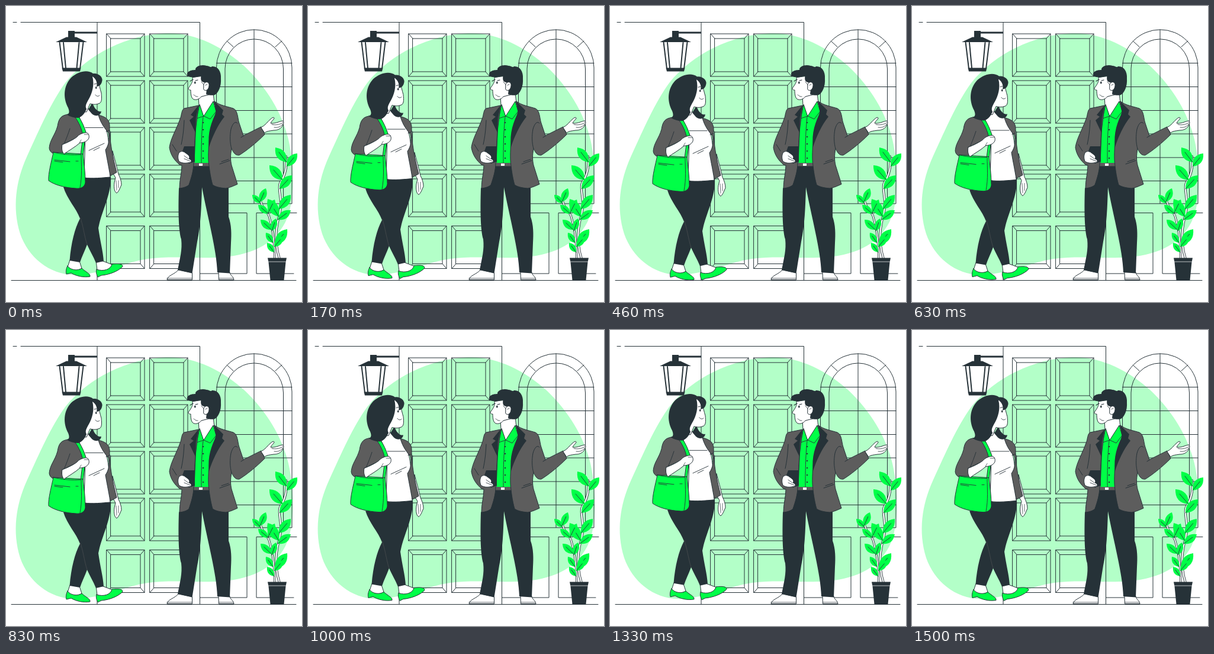
Animation, 500 px wide and 500 px high, one loop 1540 ms. Source, as an HTML page with a canvas:

```html
<!DOCTYPE html>
<html lang="en">
<head>
<meta charset="utf-8">
<title>At the front door</title>
<style>
html, body { margin: 0; width: 100%; height: 100%; overflow: hidden; background: #fff; }
canvas { display: block; width: 100vw; height: 100vh; }
</style>
</head>
<body>
<canvas id="stage" width="500" height="500"></canvas>
<script>
const ctx = document.getElementById('stage').getContext('2d');
const GREEN = '#00ff47', PALE = '#b3ffc8', DARK = '#263238', GRAY = '#5d5d5d', WHITE = '#fff';
const LOOP = 1540, LOWEST = 480, SWING = 3.8;

const shape = (d, fill, line = DARK, width = 1) => ({ path: new Path2D(d), fill, line, width });
const flat = (d, fill) => shape(d, fill, null);
const stroke = (d, width = 1, color = DARK) => shape(d, null, color, width);

function doorPanel(x, y) {
  return stroke(`M${x} ${y}h64v72h-64ZM${x + 7} ${y + 8}h50v56h-50Z
    M${x} ${y}l7 8M${x + 64} ${y}l-7 8M${x} ${y + 72}l7 -8M${x + 64} ${y + 72}l-7 -8`);
}

// A leaf grows from its base (x, y) to its tip (tx, ty).
function leaf([x, y, tx, ty]) {
  const dx = tx - x, dy = ty - y;
  const side = s => `${x + dx * .5 - dy * .48 * s} ${y + dy * .5 + dx * .48 * s}`;
  return [
    flat(`M${x} ${y}Q${side(1)} ${tx} ${ty}Q${side(-1)} ${x} ${y}Z`, GREEN),
    stroke(`M${x} ${y}L${x + dx * .68} ${y + dy * .68}`, .9)
  ];
}

const building = [
  flat(`M270 46C318 44 365 68 403 102C440 137 466 180 477 225C488 275 489 340 468 372
    C445 410 400 424 350 425C310 426 280 422 240 427C200 433 165 452 120 454
    C75 456 38 425 24 385C10 340 17 295 35 255C58 205 75 165 100 130C140 80 205 49 270 46Z`, PALE),
  stroke('M12 27.5H18M25 27.5H327.5V463.5M154 27.5V463.5M9 463.5H490'),
  ...[47, 126, 205, 284, 371.5].flatMap(y => [doorPanel(170, y), doorPanel(243, y)]),
  stroke(`M355.5 333.5V104A63.7 64 0 0 1 483 104V333.5ZM370 333.5V106A49.2 50 0 0 1 468.5 106V333.5
    M419 40V333.5M373 59L384 69M466 59L455 69`),
  stroke([96.5, 136.5, 176.5, 216, 256, 295.5].map(y => `M355.5 ${y}H483`).join('')),
  stroke('M342 349.5H407V452H327.5M491 349.5H423V452H486')
];

const lamp = [
  flat('M116 43.5H154V46.5H116ZM105 42H116V53H105Z', DARK),
  flat('M90 61H131L125 107H96Z', WHITE),
  stroke('M90.5 61L96 106M130.5 61L125 106M97 62L101 105M123.5 62L119.5 105', 2),
  flat('M84 61L102 52.5H119L137 61ZM94.5 104.5H126.5L125 110.5H96Z', DARK)
];

const leaves = [
  [474, 264, 455, 239], [474, 271, 492, 249], [467, 294, 445, 269], [462, 309, 483, 286],
  [461, 343, 481, 319], [461, 356, 442, 326], [459, 361, 481, 345], [455, 403, 475, 377],
  [430, 333, 416, 319], [429, 331, 439, 308], [443, 351, 426, 336], [443, 349, 454, 327],
  [448, 378, 430, 361], [449, 380, 456, 359], [451, 400, 439, 383], [453, 407, 468, 389],
  [453, 416, 441, 400]
].flatMap(leaf);

const plant = [
  stroke('M462 427C452 395 457 370 463 347C468 327 458 310 463 299C472 285 475 272 473 254', 4),
  stroke('M462 427C452 395 457 370 463 347C468 327 458 310 463 299C472 285 475 272 473 254', 2.3, WHITE),
  stroke('M454 427C453 402 452 380 444 354C438 342 430 338 430 325', 3.5),
  stroke('M454 427C453 402 452 380 444 354C438 342 430 338 430 325', 1.8, WHITE),
  ...leaves,
  flat('M442 425.5H474L472.5 433L469.5 463H446.5L443.5 433Z', DARK),
  stroke('M443.5 432H472.5', .7, WHITE)
];

const man = [
  shape('M291 446C284 454 273 455 272 462.5H314.5V451Z', WHITE),
  shape('M359 450L359.5 462.5H385C384 456 379 456 378 450Z', WHITE),
  stroke('M272 460H314M360 460H384', .8),
  flat(`M295 305L316 268H345L376 304V356C381 370 381 385 380 400L378 451.5L357 450
    C356 412 340 355 331 306C330 340 329 370 323 398L314.5 451.5L290 446
    C294 425 298 412 296 394C291 378 291 340 292 308Z`, DARK),
  shape('M325 152L326 168L334 187L352 165L350 146Z', WHITE),
  shape(`M327 167C322 174 320 181 321 190L318 266L343 267C341 240 346 215 350 199
    L355 178L350 161L334 186Z`, GREEN),
  stroke('M327 167L322 190L334 186L345 191L355 178M333 187C330 214 330 242 330 266', .9),
  flat([196, 208, 220, 232, 244, 256].map(y => `M332 ${y}h2v2h-2Z`).join(''), DARK),
  flat('M316 265H345V270.5H316Z', GRAY),
  flat('M326 266H332V270H326Z', WHITE),
  shape(`M325 168L301 173C296 176 297 184 294 191C288 208 278 224 276 239
    C278 252 285 261 293 268L297 269C297 281 293 294 293 308C301 307 306 305 309 302
    C313 290 317 278 317 264L320 212Z`, GRAY),
  shape(`M352 161C361 168 375 170 384 173C392 177 391 189 394 198L401 219L431 204L437 217
    C423 231 407 244 394 252C387 253 384 247 381 241C379 252 379 260 381 269L391 301
    C384 304 378 307 371 308C360 307 353 305 349 302C345 288 343 272 342 260
    C341 225 348 200 355 180Z`, GRAY),
  flat('M325 168L312 184L317 187L310 193L320 214L321 190Z', DARK),
  flat('M352 161L367 176L365 183L369 187C357 202 349 220 343 238C340 215 347 195 355 180Z', DARK),
  stroke('M301 193C300 211 299 220 296 234M391 198C387 194 383 198 380 208C378 219 378 231 381 241M361 267L378 261M364 263L376 259M402 219L397 222M281 234L288 245'),
  flat('M301 237H319V263L309 266L297 248Z', DARK),
  shape('M293 247C290 251 290 257 292 262C296 266 304 266 312 264C315 261 311 259 309 258C312 254 307 251 303 248C299 245 296 245 293 247Z', WHITE),
  stroke('M301 253L308 258M301 258L311 262', .8),
  shape(`M431 205C438 202 442 195 447 191C450 188 453 187 453 190C451 193 448 195 447 198
    C455 199 461 195 467 194C471 196 468 200 466 204C463 208 458 210 452 210
    C446 211 441 211 437 214Z`, WHITE),
  stroke('M449 200C455 202 463 200 468 197M453 205C459 206 464 204 467 200', .8),
  shape(`M315 121C316 126 314 131 310 136C307 140 308 142 312 142C312 149 313 157 318 158
    C322 159 327 157 330 153L350 148L350 116Z`, WHITE),
  flat(`M307 119C303 111 312 108 320 108C319 102 330 98 339 101C343 101 346 105 348 102
    C357 101 364 110 363 122C364 136 359 146 353 150C348 152 341 150 338 149L339 140
    L335 129C327 128 330 120 329 118C321 121 313 121 307 119Z`, DARK),
  shape('M334 132C337 126 344 128 343 135C342 142 337 145 334 141Z', WHITE),
  stroke('M330 128L334 133M337 134L340 132M324 153C321 154 319 151 317 150', .8),
  stroke('M311 127L316 124M320 126L324 125', 1.2),
  flat('M318 129.5a1.3 2 0 1 0 2.6 0a1.3 2 0 1 0-2.6 0Z', DARK)
];

const woman = [
  // Legs and shoes
  shape('M108 429L104 441C110 448 122 448 128 443L124 431Z', WHITE),
  shape(`M104 439C101 445 101 449 102 453L110 451C118 456 131 459 142 457
    C143 452 134 449 128 443C121 448 108 446 104 439Z`, GREEN),
  shape('M152 430L154 446C165 450 177 446 180 437L164 431Z', WHITE),
  shape(`M153 445C151 450 154 455 155 458L161 455C174 454 190 448 197 440
    C197 435 189 435 179 436C177 445 165 449 153 445Z`, GREEN),
  flat(`M132 288L177 288C178 315 165 340 158 366L156 375C159 397 164 415 165 431L152 434
    C147 422 141 412 137 403C133 414 128 423 125 433L107.5 430C110 400 116 376 125 359
    C119 342 103 326 97 306L118 304Z`, DARK),
  stroke('M125 357C130 368 132 388 137 403', .5, GRAY),
  // Torso and jacket
  shape(`M180 245C183 257 187 270 190 284C193 290 195 296 195 302C192 309 190 314 187 316
    C183 314 182 307 183 298L185 290L181 283Z`, WHITE),
  stroke('M186 295L187 311M190 295L190 307', .7),
  shape(`M136 174L124 188L134 214L132 290C146 292 163 290 176 289L174 248
    C174 225 171 202 158 186L151 174Z`, WHITE),
  stroke('M134 205.5H164M140 244L166 232M148 244L158 239', .9),
  shape(`M156 184C168 187 174 191 175 201C174 226 181 258 187 281L176 287
    C173 269 170 255 168 243C174 234 175 225 173 214C168 208 160 199 156 184Z`, GRAY),
  shape(`M106 183C93 184 89 190 87 203C83 218 74 226 73 240C74 250 85 252 98 250L95 234
    L122 221L132 215L121 187Z`, GRAY),
  stroke('M108 207C105 216 102 224 98 233M169 212L175 210', .9),
  // Bag
  shape('M117 188L122 186C128 194 132 204 135 213L130 253L126 252L130 219C128 207 123 197 117 188Z', GREEN),
  shape(`M80 247L130 250C132 267 134 282 134 298C133 306 126 309 118 308
    C101 307 83 303 72 295C71 283 77 262 80 247Z`, GREEN),
  stroke('M80 247C95 251 112 252 127 251C127 270 129 286 125 307M82 260L108 263M82 262L96 264M118 262H122', .9),
  shape(`M95 234C106 230 115 225 120 221C123 217 128 215 133 214C139 213 141 218 140 223
    C138 228 132 231 125 231C116 239 106 244 98 250C94 246 94 239 95 234Z`, WHITE),
  stroke('M132 217L139 217M124 231L127 226', .7),
  // Head
  flat('M146 163C149 174 155 179 161 178C160 185 152 188 145 182L139 175Z', DARK),
  shape(`M145 116L156 124C157 133 159 140 161 147C162 157 162 164 156 165
    C151 167 146 166 142 165L136 179L125 178L130 135Z`, WHITE),
  flat(`M102 183C108 183 107 177 105 172C96 155 97 135 110 121C122 110 138 107 147 114
    C157 113 165 121 162 128C161 133 157 136 153 136C155 129 151 122 146 119
    C150 134 145 148 140 157C136 164 133 169 136 174C133 182 128 187 122 189
    C115 189 108 187 102 183Z`, DARK),
  stroke('M151 150C153 153 156 153 158 151M149 132L153 131', .9),
  flat('M151 138a1.2 2 0 1 0 2.4 0a1.2 2 0 1 0-2.4 0Z', DARK)
];

function draw(shapes) {
  for (const { path, fill, line, width } of shapes) {
    if (fill) { ctx.fillStyle = fill; ctx.fill(path); }
    if (line) { ctx.strokeStyle = line; ctx.lineWidth = width; ctx.stroke(path); }
  }
}

const bob = t => SWING * Math.cos(2 * Math.PI * (t - LOWEST) / LOOP);
const start = performance.now();

function render() {
  const t = (performance.now() - start) % LOOP;
  ctx.fillStyle = WHITE;
  ctx.fillRect(0, 0, 500, 500);
  [building, lamp, man, plant].forEach(draw);
  ctx.save();
  ctx.translate(0, bob(t) - bob(0));
  draw(woman);
  ctx.restore();
  requestAnimationFrame(render);
}

ctx.lineJoin = ctx.lineCap = 'round';
render();
</script>
</body>
</html>
```
